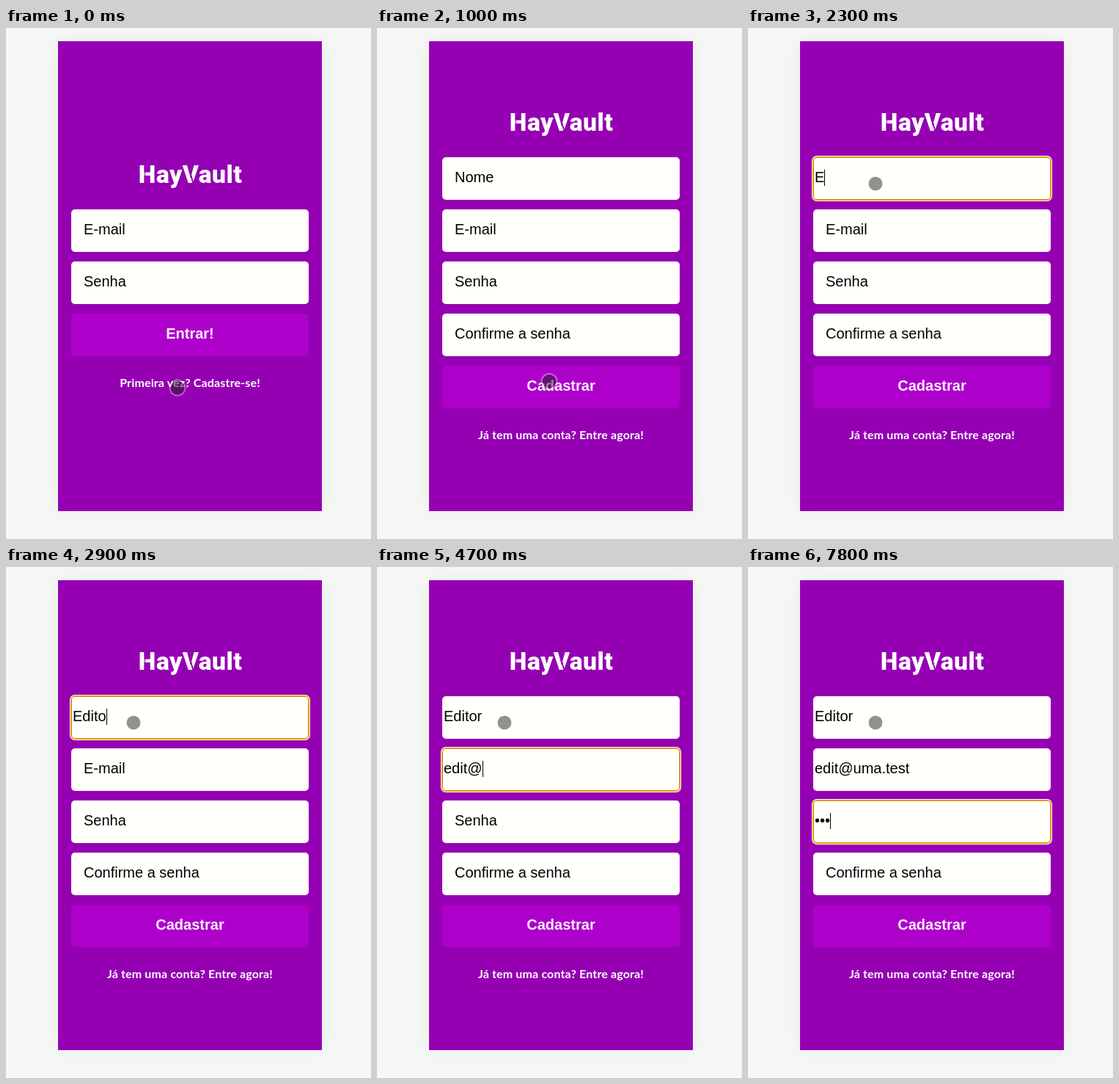
An HTML page that plays this animation: 498 px wide and 696 px high, repeating every 8 s.

```html
<!DOCTYPE html>
<html lang="pt-BR">
<head>
<meta charset="utf-8">
<title>Cadastro</title>
<style>
  html, body { margin: 0; width: 100%; height: 100%; overflow: hidden; background: #f6f8f6; }
  #panel {
    position: absolute; left: 71px; top: 18px; width: 360px; height: 640px;
    background: #9500b3; box-shadow: 0 0 30px rgba(0, 0, 0, .06);
  }
  .screen { position: absolute; left: 18px; width: 324px; text-align: center; }
  h1 {
    margin: 0; padding: 0 0 27px 1px; color: #fff; white-space: nowrap;
    font: 900 33.5px/40px Roboto, sans-serif; letter-spacing: .5px;
  }
  .cut {
    color: transparent; -webkit-background-clip: text; background-clip: text;
    background-image: linear-gradient(var(--angle), #fff var(--at), transparent 0 calc(var(--at) + 6%), #fff 0);
  }
  .row {
    position: relative; box-sizing: border-box; height: 58px; margin-bottom: 13px;
    padding: 16px 2px 0; border-radius: 5px; white-space: nowrap;
    font: 20px/23px "Liberation Sans", Arial, sans-serif;
  }
  .field { background: #fffffb; color: #000; text-align: left; }
  .button { background: #ae00cb; color: #fdf0ff; font-weight: bold; }
  .link {
    padding-top: 13px; color: #fff; white-space: nowrap;
    font: 700 16px/20px Lato, sans-serif; letter-spacing: .15px;
  }
  .hint { position: absolute; left: 17px; }
  .caret { display: none; width: 1px; height: 22px; margin-top: 1px; vertical-align: top; background: #000; }
  .focus { box-shadow: 0 0 0 1px #e59700, 0 0 0 2px #fff, inset 0 0 0 1px #e59700; }
  .focus .caret { display: inline-block; }
  #pointer {
    position: absolute; left: -11.5px; top: -11.5px; width: 19px; height: 19px; border-radius: 50%;
    border: 2px solid rgba(255, 255, 255, .35);
    background: rgba(32, 34, 30, .49) padding-box;
  }
</style>
</head>
<body>
<div id="panel"></div>
<div id="pointer"></div>
<script>
const LOOP = 8000, SIGNUP_AT = 1000;
const panel = document.getElementById('panel');
const pointer = document.getElementById('pointer');

const field = label =>
  `<div class="row field"><span class="value"></span><i class="caret"></i><span class="hint">${label}</span></div>`;

function addScreen(top, labels, button, link) {
  const screen = document.createElement('div');
  screen.className = 'screen';
  screen.style.top = top + 'px';
  screen.innerHTML = `
    <h1><span class="cut" style="--angle:90deg;--at:32%">H</span>ay<span class="cut" style="--angle:74deg;--at:47%">V</span>ault</h1>
    ${labels.map(field).join('')}
    <div class="row button">${button}</div>
    <div class="link">${link}</div>`;
  panel.append(screen);
  return screen;
}

const login = addScreen(162, ['E-mail', 'Senha'], 'Entrar!', 'Primeira vez? Cadastre-se!');
const signup = addScreen(91, ['Nome', 'E-mail', 'Senha', 'Confirme a senha'],
  'Cadastrar', 'Já tem uma conta? Entre agora!');
const fields = [...signup.querySelectorAll('.field')];

// Each entry: focus interval and the time of every keystroke.
const entries = [
  { text: 'Editor', from: 1800, to: 3300, keys: [2300, 2600, 2700, 2800, 2900, 3300] },
  { text: 'edit@uma.test', from: 3300, to: 6900,
    keys: [4000, 4100, 4300, 4500, 4700, 5100, 5500, 5600, 5900, 6000, 6200, 6400, 6400] },
  { text: '•••', from: 6900, to: LOOP, keys: [7700, 7800, 7800] }
];

// Pointer positions: time, x, y; each holds until the next.
const moves = [
  [0, 233.5, 489.5], [100, 238.5, 500.5], [400, 234, 479.5], [500, 234.5, 481],
  [1300, 237, 455], [1400, 212, 340], [1500, 180, 238.5],
  [1700, 177.5, 214.5], [1800, 174.5, 212.5], [1900, 173.5, 211.5]
];

function draw(t) {
  login.hidden = t >= SIGNUP_AT;
  signup.hidden = !login.hidden;
  entries.forEach(({ text, from, to, keys }, i) => {
    const [value, , hint] = fields[i].children;
    value.textContent = text.slice(0, keys.filter(k => k <= t).length);
    hint.hidden = value.textContent !== '';
    fields[i].classList.toggle('focus', t >= from && t < to);
  });
  const [, x, y] = moves.filter(m => m[0] <= t).pop();
  pointer.style.transform = `translate(${x}px, ${y}px)`;
}

const start = performance.now();
function tick() {
  draw((performance.now() - start) % LOOP);
  requestAnimationFrame(tick);
}
tick();
</script>
</body>
</html>
```
